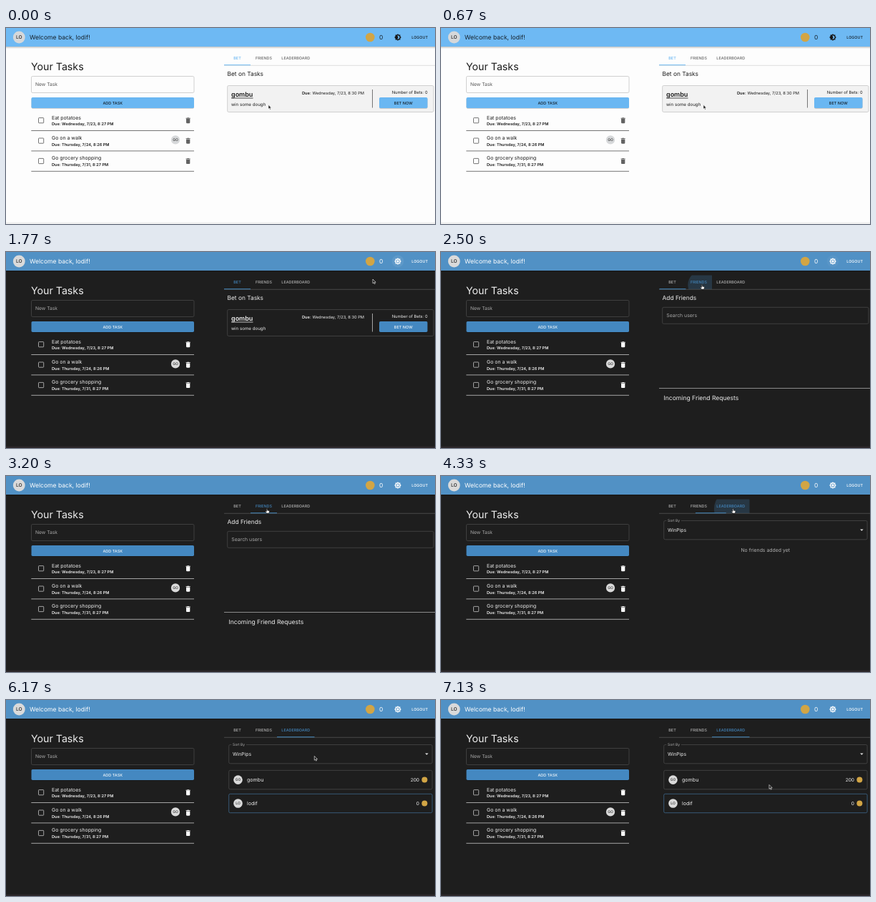
Recreate the animation shown at these times as an HTML page. Size 600 by 274 pixels, loop 7170 ms.

```html
<!DOCTYPE html>
<html lang="en">
<head>
<meta charset="utf-8">
<title>Task bets</title>
<style>
  html, body { margin: 0; width: 100%; height: 100%; overflow: hidden; }
  svg {
    display: block; width: 600px; height: 274px; background: var(--bg);
    font-family: Inter, "Open Sans", sans-serif; text-rendering: geometricPrecision;
    --bg: #fdfdfd; --bar: #6eb9f3; --btn: #6ab7f2; --accent: #6ab7f2;
    --ink: #1c1c1c; --head: #16222c; --soft: #666; --hint: #555;
    --line: #c6c6c6; --rule: #757575; --tabline: #dedede; --icon: #626262;
    --btnink: #14202a; --avatar: #d6d8da; --strip: #f0f0f0; --split: #888;
  }
  svg.dark {
    --bg: #1e1e1e; --bar: #5191c5; --btn: #4488c1; --accent: #4385bb;
    --ink: #ededed; --head: #fff; --soft: #b0b0b0; --hint: #a8a8a8;
    --line: #484848; --rule: #a4a4a4; --tabline: #484848; --icon: #fff;
    --btnink: #eef4f8; --avatar: #dadada; --strip: #2b2729; --split: #8c8c8c;
  }
  text { fill: var(--ink); white-space: pre; }
  .box { fill: none; stroke: var(--line); stroke-width: .8; }
  .rule { stroke: var(--rule); stroke-width: 1; }
</style>
</head>
<body>
<svg id="stage" viewBox="0 0 600 274"></svg>
<script>
const LOOP = 7170;
const NS = "http://www.w3.org/2000/svg";
const stage = document.getElementById("stage");

function add(parent, tag, attrs = {}, content = "") {
  const el = document.createElementNS(NS, tag);
  for (const key in attrs) el.setAttribute(key, attrs[key]);
  if (content) el.textContent = content;
  parent.appendChild(el);
  return el;
}
const group = (parent, attrs) => add(parent, "g", attrs);
const show = (el, on) => { el.style.display = on ? "" : "none"; };

function label(parent, x, y, size, content, { color = "ink", weight = 400, anchor = "start" } = {}) {
  return add(parent, "text", {
    x, y, "font-size": size, "font-weight": weight, "text-anchor": anchor,
    style: `fill: var(--${color})`
  }, content);
}
function box(parent, x, y, width, height, style = "") {
  return add(parent, "rect", { x, y, width, height, rx: 1.8, class: "box", style });
}
function rule(parent, x1, y1, x2, y2, color = "rule") {
  return add(parent, "line", { x1, y1, x2, y2, class: "rule", style: `stroke: var(--${color})` });
}
function button(parent, x, y, width, height, caption) {
  add(parent, "rect", { x, y: y + .7, width, height, rx: 1.8, fill: "#000", opacity: .22 });
  add(parent, "rect", { x, y, width, height, rx: 1.8, style: "fill: var(--btn)" });
  label(parent, x + width / 2, y + height / 2 + 2, 5.5, caption,
    { color: "btnink", weight: 500, anchor: "middle" });
}
function avatar(parent, cx, cy, r, initials, size) {
  add(parent, "circle", { cx, cy, r, style: "fill: var(--avatar)" });
  const t = label(parent, cx, cy + size * .36, size, initials, { weight: 500, anchor: "middle" });
  t.style.fill = "#2c2c2c";
}
const coin = (parent, cx, cy, r) => add(parent, "circle", { cx, cy, r, fill: "#d2a545" });

// Page strip and header
add(stage, "rect", { x: 0, y: 271.5, width: 600, height: 2.5, style: "fill: var(--strip)" });
[[29, .04], [28, .07], [27, .1]].forEach(([height, opacity]) =>
  add(stage, "rect", { x: 0, y: 0, width: 600, height, opacity }));
add(stage, "rect", { x: 0, y: 0, width: 600, height: 26, style: "fill: var(--bar)" });
avatar(stage, 18.3, 13, 8.4, "LO", 6.6);
label(stage, 33, 16.1, 8.55, "Welcome back, lodif!", { color: "head" });
coin(stage, 509.3, 13, 6.3);
label(stage, 522, 16, 8.4, "0", { color: "head" });
label(stage, 590, 15, 5.4, "LOGOUT", { color: "head", weight: 500, anchor: "end" });

const halo = add(stage, "circle", { cx: 548, cy: 13 });
const sunburst = "M20 8.69V4h-4.69L12 .69 8.69 4H4v4.69L.69 12 4 15.31V20h4.69L12 23.31 15.31 20H20v-4.69L23.31 12Z";
function themeIcon(inner, fill) {
  return add(stage, "path", {
    d: sunburst + inner, fill, "fill-rule": "evenodd",
    transform: "translate(542.9 7.9) scale(.425)"
  });
}
const moon = themeIcon("M12 18c-.9 0-1.7-.2-2.5-.55a6 6 0 0 0 0-10.9A6 6 0 1 1 12 18Z", "#161616");
const sun = themeIcon("M12 18a6 6 0 1 1 0-12 6 6 0 0 1 0 12ZM12 8a4 4 0 1 0 0 8 4 4 0 0 0 0-8Z", "#fff");

// Task list
label(stage, 35, 59, 14.2, "Your Tasks");
box(stage, 35.5, 67.5, 227.5, 23);
label(stage, 41, 81.3, 6.7, "New Task", { color: "hint" });
button(stage, 35.5, 97, 227.5, 15, "ADD TASK");

[
  ["Eat potatoes", "Wednesday, 7/23, 8:27 PM"],
  ["Go on a walk", "Thursday, 7/24, 8:26 PM"],
  ["Go grocery shopping", "Thursday, 7/31, 8:27 PM"]
].forEach(([title, due], i) => {
  const row = group(stage, { transform: `translate(0 ${i * 28.4})` });
  add(row, "rect", {
    x: 45.5, y: 125.6, width: 7.2, height: 7.2, rx: .7, fill: "none",
    "stroke-width": .9, style: "stroke: var(--soft)"
  });
  label(row, 64, 127.7, 6.95, title);
  label(row, 64, 136.2, 5.6, "Due: " + due, { weight: 600 });
  add(row, "path", {
    d: "M6 19c0 1.1.9 2 2 2h8c1.1 0 2-.9 2-2V7H6ZM19 4h-3.5l-1-1h-5l-1 1H5v2h14Z",
    transform: "translate(249.4 124) scale(.44)", style: "fill: var(--icon)"
  });
  if (i === 1) avatar(row, 237, 128, 6.1, "GO", 5);
  rule(row, 35.3, 143.5, 263, 143.5);
});

// Tabs
const TABS = [
  { name: "BET", x: 305, w: 37 },
  { name: "FRIENDS", x: 342, w: 37 },
  { name: "LEADERBOARD", x: 379, w: 52.5 }
];
rule(stage, 305, 52.3, 600, 52.3, "tabline");
TABS.forEach((tab, i) => {
  const clip = add(stage, "clipPath", { id: "tab" + i });
  add(clip, "rect", { x: tab.x, y: 32.5, width: tab.w, height: 19.5 });
  const wave = group(stage, { "clip-path": `url(#tab${i})` });
  tab.ripple = add(wave, "circle", { cy: 46, style: "fill: var(--accent)" });
  tab.text = label(stage, tab.x + tab.w / 2, 44.4, 5.45, tab.name, { weight: 500, anchor: "middle" });
});
const marker = add(stage, "rect", { y: 51.2, height: 1, style: "fill: var(--accent)" });

// Bet panel
const bets = group(stage);
label(bets, 309.5, 67, 8.35, "Bet on Tasks");
const card = box(bets, 309.7, 80.5, 288.3, 37);
label(bets, 315, 96.3, 9, "gombu", { weight: 600 });
add(bets, "rect", { x: 315, y: 97.6, width: 30.5, height: .8, style: "fill: var(--ink)" });
label(bets, 315, 109.2, 6.2, "win some dough");
const due = label(bets, 414, 92.8, 5.7, "");
add(due, "tspan", { "font-weight": 600 }, "Due:");
add(due, "tspan", {}, " Wednesday, 7/23, 8:30 PM");
rule(bets, 512.5, 86, 512.5, 111.5);
label(bets, 589.6, 91.6, 5.8, "Number of Bets: 0", { anchor: "end" });
button(bets, 522, 97, 67.5, 15, "BET NOW");

// Friends panel
const friends = group(stage);
label(friends, 309.5, 67, 8.4, "Add Friends");
box(friends, 309.7, 77.3, 288.3, 23);
label(friends, 315.3, 91, 6.9, "Search users", { color: "hint" });
rule(friends, 305, 190.5, 600, 190.5, "split");
label(friends, 311.5, 206.6, 8.55, "Incoming Friend Requests");

// Leaderboard panel
const board = group(stage);
box(board, 311.7, 62.5, 284.4, 26.3);
add(board, "rect", { x: 315.3, y: 61, width: 20.6, height: 3, style: "fill: var(--bg)" });
label(board, 317, 64.2, 4.9, "Sort By", { color: "soft" });
label(board, 317, 78, 6.8, "WinPips");
add(board, "path", { d: "M586.1 74.4h4.6l-2.3 2.4Z", style: "fill: var(--ink)" });
const empty = label(board, 453.7, 106, 6.9, "No friends added yet", { color: "soft", anchor: "middle" });
const ranks = group(board);
[["gombu", "GO", "200"], ["lodif", "LO", "0"]].forEach(([name, initials, score], i) => {
  const row = group(ranks, { transform: `translate(0 ${i * 32.9})` });
  box(row, 311.7, 98.4, 284.4, 26.4, i ? "stroke: #3d678c" : "");
  avatar(row, 324.5, 111.6, 6.3, initials, 5);
  label(row, 337, 114.2, 7.1, name);
  label(row, 578, 114, 6.6, score, { anchor: "end" });
  coin(row, 585.4, 111.6, 4);
});

// Pointer
const pointer = group(stage, { fill: "#111", stroke: "#fff", "stroke-width": .6, "stroke-linejoin": "round" });
const arrow = add(pointer, "path", { d: "M0 0V5.8L1.4 4.6 2.3 6.7 3.3 6.2 2.4 4.2H4.2Z" });
const hand = add(pointer, "path", {
  fill: "#fff", stroke: "#111",
  d: "M-.6 .4Q0-.4.6.4V2.6L2.8 3Q3.5 3.2 3.4 4L2.9 6.6H-.5L-2.2 4.2Q-2.3 3.4-1.6 3.5L-.6 4.2Z"
});

const TOGGLE_DOWN = 1250, DARK = 1400, TO_FRIENDS = 2480, TO_BOARD = 4240, LOADED = 4650;
const PATH = [
  [0, 367, 107.5], [750, 367, 107.5], [1150, 554.5, 11], [1480, 554.5, 11],
  [1770, 513, 38], [2250, 365, 45.5], [3450, 365, 45.5], [3950, 408.5, 45.5],
  [5900, 408.5, 45.5], [6480, 459, 118.5], [LOOP, 459, 118.5]
];

const clamp = v => Math.min(1, Math.max(0, v));
const part = (t, from, length) => clamp((t - from) / length);
const smooth = p => p * p * (3 - 2 * p);
const mix = (a, b, p) => a + (b - a) * p;

// Standard material curve, cubic-bezier(.4, 0, .2, 1)
function material(p) {
  let lo = 0, hi = 1, s = p;
  for (let i = 0; i < 18; i++) {
    s = (lo + hi) / 2;
    const x = 1.2 * s * (1 - s) ** 2 + .6 * s * s * (1 - s) + s ** 3;
    if (x < p) lo = s; else hi = s;
  }
  return 3 * s * s * (1 - s) + s ** 3;
}

function pointerAt(t) {
  const i = PATH.findIndex(step => step[0] > t);
  const a = PATH[i - 1], b = PATH[i];
  const p = smooth(part(t, a[0], b[0] - a[0]));
  return [mix(a[1], b[1], p), mix(a[2], b[2], p)];
}

function ripple(tab, x, t, click) {
  tab.ripple.setAttribute("cx", x);
  tab.ripple.setAttribute("r", 27 * smooth(part(t, click - 150, 260)));
  tab.ripple.setAttribute("opacity", .24 * (1 - part(t, click + 180, 350)));
}

function draw(t) {
  const dark = t >= DARK;
  const active = t < TO_FRIENDS ? 0 : t < TO_BOARD ? 1 : 2;
  const [x, y] = pointerAt(t);

  stage.classList.toggle("dark", dark);
  show(moon, !dark);
  show(sun, dark);
  show(bets, active === 0);
  show(friends, active === 1);
  show(board, active === 2);
  show(empty, t < LOADED);
  show(ranks, t >= LOADED);

  const onCard = x > 310 && x < 598 && y > 80 && y < 117;
  card.style.fill = onCard && active === 0 ? (dark ? "#2a2a2a" : "#f2f2f2") : "none";

  halo.setAttribute("r", 8.4 * smooth(part(t, TOGGLE_DOWN - 80, 160)));
  halo.setAttribute("fill", dark ? "#fff" : "#123");
  halo.setAttribute("opacity", (dark ? .08 : .25) * (1 - part(t, TO_FRIENDS - 100, 250)));

  const from = TABS[Math.max(0, active - 1)], to = TABS[active];
  const p = active ? material(part(t, active === 1 ? TO_FRIENDS : TO_BOARD, 300)) : 1;
  marker.setAttribute("x", mix(from.x, to.x, p));
  marker.setAttribute("width", mix(from.w, to.w, p));
  TABS.forEach((tab, i) => {
    tab.text.style.fill = `var(--${i === active ? "accent" : "soft"})`;
  });
  ripple(TABS[1], 365, t, TO_FRIENDS);
  ripple(TABS[2], 408.5, t, TO_BOARD);

  const onTab = x > 305 && x < 431.5 && y > 33 && y < 52;
  const onToggle = Math.hypot(x - 548, y - 13) < 9;
  pointer.setAttribute("transform", `translate(${x} ${y})`);
  show(hand, onTab || onToggle);
  show(arrow, !onTab && !onToggle);
}

const start = performance.now();
function tick() {
  draw((performance.now() - start) % LOOP);
  requestAnimationFrame(tick);
}
tick();
</script>
</body>
</html>
```
